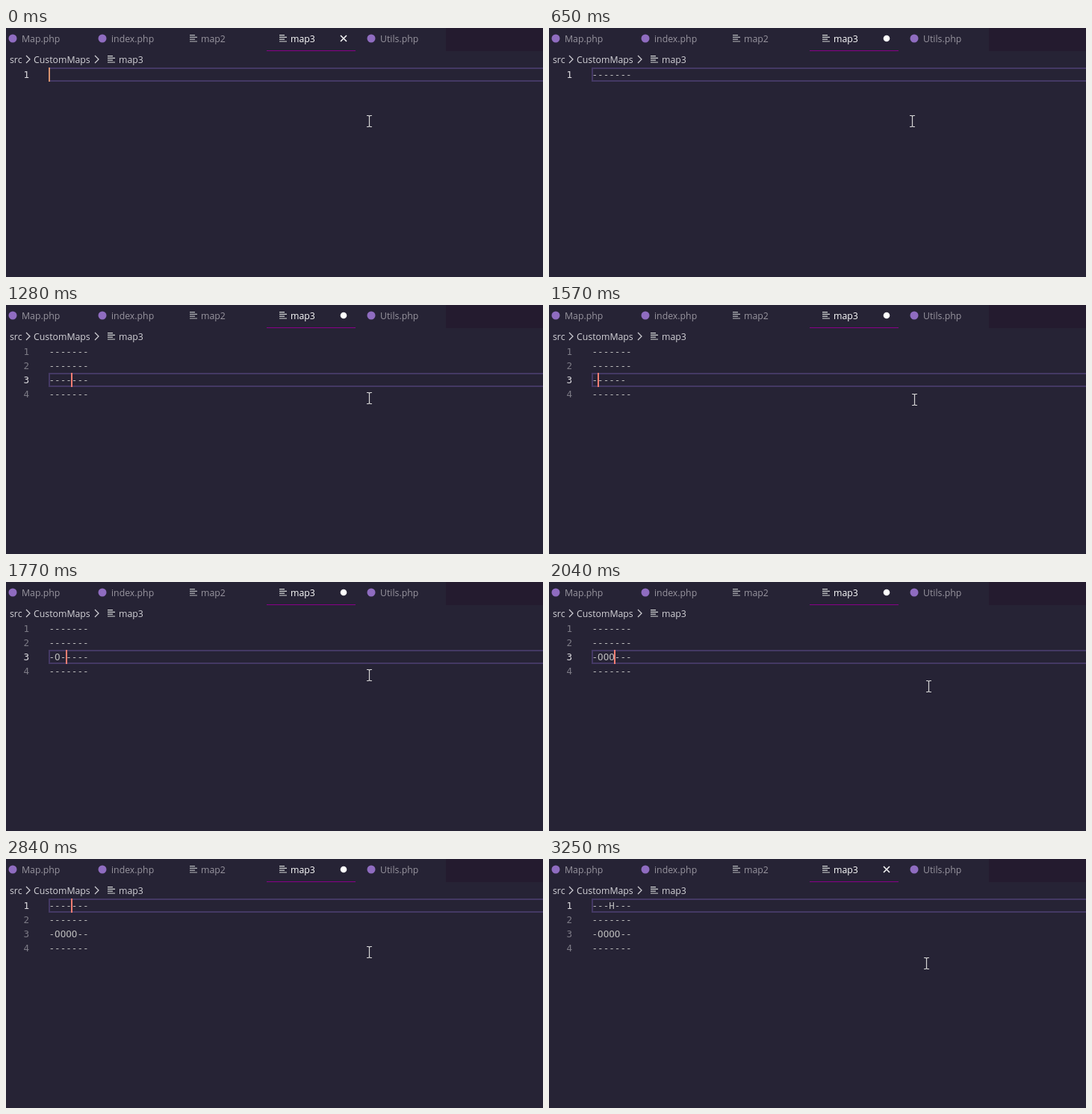
Recreate the animation shown at these times as an HTML page. Size 719x334 px, loop 3350 ms.

```html
<!DOCTYPE html>
<html lang="en">
<head>
<meta charset="utf-8">
<title>Map editor</title>
<style>
  html, body { margin: 0; width: 100%; height: 100%; overflow: hidden; background: #262335; }
  svg { display: block; width: 719px; height: 334px; }
  .ui { font: 12.3px "Open Sans", "Noto Sans", sans-serif; fill: #98959f; }
  .ui .on { fill: #fff; }
  .crumb { fill: #d3d2d7; }
  .code { font: 12.6px "DejaVu Sans Mono", monospace; fill: #bbb; }
  .num { fill: #7d7b86; text-anchor: end; }
  .num.on { fill: #dedde1; }
  .line { fill: none; stroke-width: 1.2; }
</style>
</head>
<body>
<svg viewBox="0 0 719 334" xmlns="http://www.w3.org/2000/svg">
  <defs>
    <path id="fileIcon" class="line" d="M0 .6h7M0 3.4h10M0 6.2h7M0 9h10"/>
    <path id="chevron" class="line" stroke="#d3d2d7" d="M0 0l5 5l-5 5"/>
  </defs>
  <rect width="719" height="334" fill="#262335"/>
  <rect x="589" width="130" height="31" fill="#241b2f"/>
  <rect x="349" y="30" width="119" height="1" fill="#880088"/>

  <g class="ui">
    <g fill="#8f6cc0">
      <circle cx="9" cy="14" r="5.5"/>
      <circle cx="129" cy="14" r="5.5"/>
      <circle cx="489" cy="14" r="5.5"/>
    </g>
    <text x="21" y="19">Map.php</text>
    <text x="141" y="19">index.php</text>
    <use href="#fileIcon" x="246" y="9" stroke="#b5b7ba"/>
    <text x="261" y="19">map2</text>
    <use href="#fileIcon" x="366" y="9" stroke="#d4d7d6"/>
    <text class="on" x="381" y="19">map3</text>
    <text x="501" y="19">Utils.php</text>
    <path id="close" class="line" stroke="#fff" style="stroke-width:1.5" d="M448 10l8 8m0-8l-8 8"/>
    <circle id="dirty" cx="452" cy="14" r="4.3" fill="#fff"/>

    <text class="crumb" x="5" y="47">src</text>
    <use href="#chevron" x="27" y="37"/>
    <text class="crumb" x="37" y="47">CustomMaps</text>
    <use href="#chevron" x="119" y="37"/>
    <use href="#fileIcon" x="136" y="37" stroke="#d4d7d6"/>
    <text class="crumb" x="151" y="47">map3</text>
  </g>

  <rect id="current" x="58" width="680" height="17" fill="none" stroke="#443964" stroke-width="2"/>
  <g id="rows" class="code"></g>
  <rect id="caret" width="2" height="19"/>
  <path id="mouse" class="line" stroke="#d6d6d6" d="M-3.5-7.5h2.5l1 1l1-1h2.5M0-6.5v13M-3.5 7.5h2.5l1-1l1 1h2.5"/>
</svg>
<script>
const LOOP = 3350, ROW = 19, TOP = 53, LEFT = 57, CHAR = 7.585;
const $ = id => document.getElementById(id);

// Keystrokes as [time, key]; single characters are typed.
const keys = [
  ...Array.from({ length: 7 }, (_, i) => [20 + 75 * i, '-']),
  [550, 'hide'],
  [710, 'enter'], [750, 'paste'], [790, 'enter'], [830, 'paste'], [870, 'enter'], [910, 'paste'],
  [980, 'up'], [1050, 'up'],
  [1150, 'down'], [1190, 'left'], [1240, 'left'], [1280, 'left'],
  [1310, 'left'], [1360, 'left'], [1480, 'back'], [1600, 'O'],
  [1770, 'right'], [1820, 'back'], [1870, 'O'],
  [1920, 'right'], [1970, 'back'], [2020, 'O'],
  [2080, 'right'], [2140, 'back'], [2200, 'O'],
  [2510, 'up'], [2620, 'up'], [2740, 'left'],
  [2930, 'back'], [2980, 'H'], [3040, 'save'], [3250, 'hide']
];

// Pointer stops as [time, x, y].
const pointer = [
  [0, 486, 125],
  [1400, 486, 125], [1460, 505, 140], [1520, 505, 140], [1580, 486, 125],
  [1980, 486, 125], [2040, 508, 140], [2090, 508, 140], [2150, 486, 125],
  [3090, 486, 125], [3240, 505, 140], [LOOP, 505, 140]
];

const actions = {
  hide: s => { s.caret = false; },
  save: s => { s.dirty = false; },
  up: s => { s.row--; },
  down: s => { s.row++; },
  left: s => { s.col--; },
  right: s => { s.col++; },
  enter: s => { s.lines.splice(++s.row, 0, ''); s.col = 0; },
  paste: s => insert(s, '-------'),
  back: s => {
    const text = s.lines[s.row];
    s.lines[s.row] = text.slice(0, s.col - 1) + text.slice(s.col);
    s.col--;
  }
};

function insert(s, added) {
  const text = s.lines[s.row];
  s.lines[s.row] = text.slice(0, s.col) + added + text.slice(s.col);
  s.col += added.length;
  s.dirty = true;
}

function stateAt(t) {
  const s = { lines: [''], row: 0, col: 0, caret: true, dirty: false };
  for (const [time, key] of keys) {
    if (time > t) break;
    if (key !== 'hide') s.caret = true;
    if (actions[key]) actions[key](s);
    else insert(s, key);
  }
  return s;
}

function pointerAt(t) {
  const i = pointer.findIndex(p => p[0] > t);
  const [t0, x0, y0] = pointer[i - 1], [t1, x1, y1] = pointer[i];
  const k = (t - t0) / (t1 - t0);
  return [Math.round(x0 + (x1 - x0) * k), Math.round(y0 + (y1 - y0) * k)];
}

function addText(x, y, className) {
  const el = document.createElementNS('http://www.w3.org/2000/svg', 'text');
  el.setAttribute('x', x);
  el.setAttribute('y', y);
  el.setAttribute('class', className);
  return $('rows').appendChild(el);
}

const rows = Array.from({ length: 4 }, (_, i) => ({
  num: addText(31, TOP + 14 + ROW * i, 'num'),
  text: addText(LEFT + .5, TOP + 14 + ROW * i, '')
}));

const show = (el, on) => el.setAttribute('visibility', on ? 'visible' : 'hidden');

function render(t) {
  const s = stateAt(t), y = TOP + ROW * s.row;
  rows.forEach(({ num, text }, i) => {
    num.textContent = i < s.lines.length ? i + 1 : '';
    num.setAttribute('class', i === s.row ? 'num on' : 'num');
    text.textContent = s.lines[i] || '';
  });
  $('current').setAttribute('y', y + 1);
  $('caret').setAttribute('x', Math.round(LEFT + CHAR * s.col));
  $('caret').setAttribute('y', y);
  $('caret').setAttribute('fill', t < 20 ? '#d8936f' : '#f97e72');
  show($('caret'), s.caret);
  show($('dirty'), s.dirty);
  show($('close'), !s.dirty);
  const [mx, my] = pointerAt(t);
  $('mouse').setAttribute('transform', `translate(${mx + .5} ${my})`);
}

const start = performance.now();
function tick() {
  render((performance.now() - start) % LOOP);
  requestAnimationFrame(tick);
}
tick();
</script>
</body>
</html>
```
